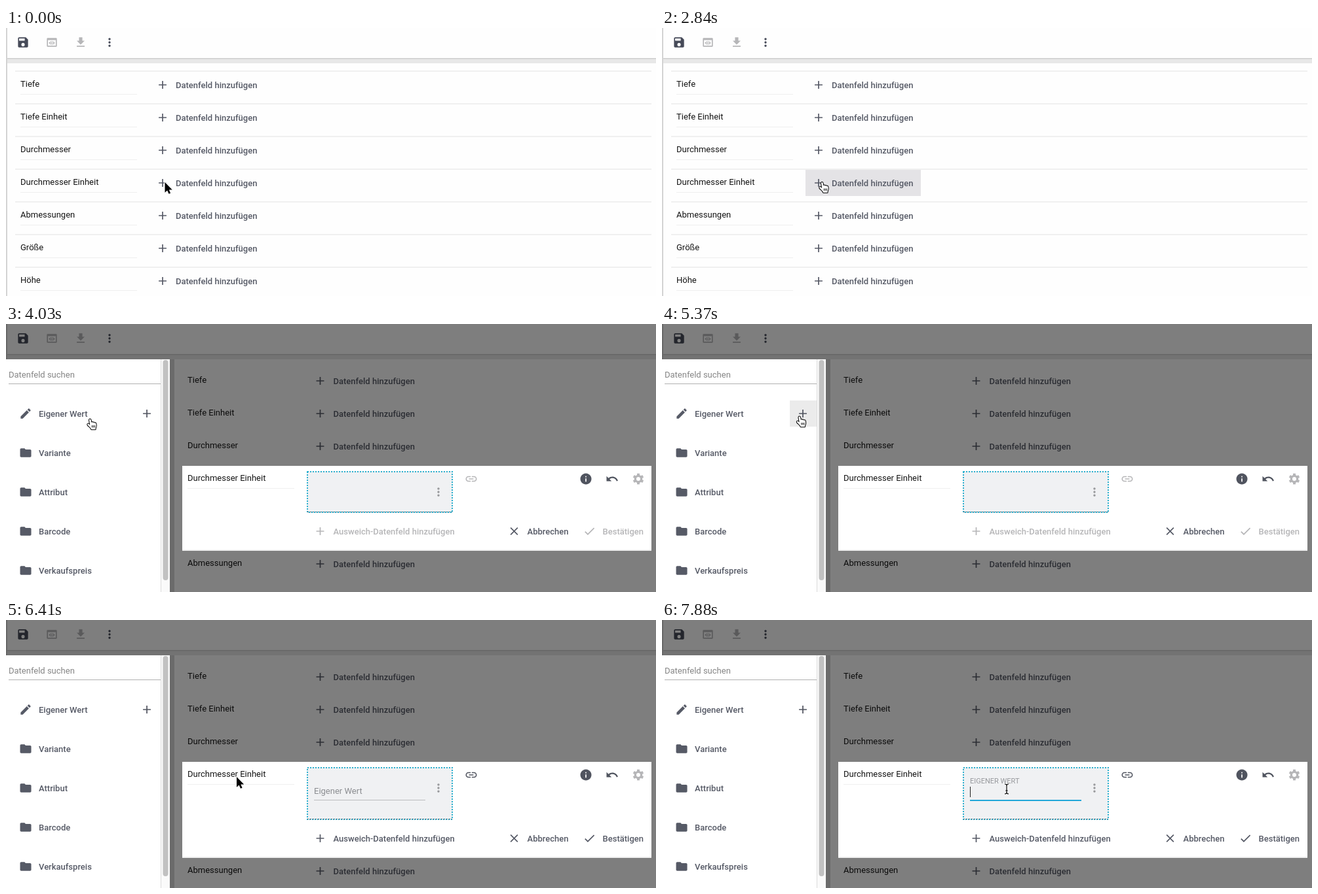
An HTML page with a canvas for the animation above (8000 ms loop, 992 by 410 pixels).

```html
<!DOCTYPE html>
<html lang="de">
<head>
<meta charset="utf-8">
<title>Datenfeld hinzufügen</title>
<style>
html, body { margin: 0; width: 100%; height: 100%; overflow: hidden; background: #fff; }
canvas { display: block; }
</style>
</head>
<body>
<canvas id="stage" width="992" height="410"></canvas>
<script>
const ctx = document.getElementById('stage').getContext('2d');
const LOOP = 8000;
const INK = '#151515', DARK = '#565a66', ICON = '#50545f', OFF = '#b6b6b8', HINT = '#8b8d91';

const ICONS = {
  save: 'M17 3H5c-1.1 0-2 .9-2 2v14c0 1.1.9 2 2 2h14c1.1 0 2-.9 2-2V7zM12 19a3 3 0 1 1 0-6a3 3 0 1 1 0 6zM15 9H5V5h10z',
  preview: 'M4 4h16l1 1v14l-1 1H4l-1-1V5zM5 8v10h14V8zM6.5 13q5.5-7 11 0q-5.5 7-11 0zM12 10.4a2.6 2.6 0 1 0 .01 0zM12 11.6a1.4 1.4 0 1 0 .01 0z',
  download: 'M19 9h-4V3H9v6H5l7 7zM5 18v2h14v-2z',
  more: 'M12 4a2 2 0 1 0 .01 0zM12 10a2 2 0 1 0 .01 0zM12 16a2 2 0 1 0 .01 0z',
  add: 'M11 5h2v6h6v2h-6v6h-2v-6H5v-2h6z',
  folder: 'M10 4H4c-1.1 0-2 .9-2 2v12c0 1.1.9 2 2 2h16c1.1 0 2-.9 2-2V8c0-1.1-.9-2-2-2h-8z',
  edit: 'M3 17.25V21h3.75L17.8 9.94l-3.75-3.75zM20.7 7.04c.4-.4.4-1 0-1.4l-2.3-2.35c-.4-.4-1-.4-1.4 0l-1.85 1.83 3.75 3.75z',
  link: 'M3.9 12A3.1 3.1 0 0 1 7 8.9h4V7H7a5 5 0 0 0 0 10h4v-1.9H7A3.1 3.1 0 0 1 3.9 12zM8 13h8v-2H8zM17 7h-4v1.9h4a3.1 3.1 0 0 1 0 6.2h-4V17h4a5 5 0 0 0 0-10z',
  info: 'M12 2a10 10 0 1 0 .01 0zM11 11h2v6h-2zM11 7h2v2h-2z',
  undo: 'M12.5 8c-2.65 0-5.05 1-6.9 2.6L2 7v9h9l-3.6-3.6c1.4-1.2 3.15-1.9 5.1-1.9 3.55 0 6.55 2.3 7.6 5.5l2.37-.8C21.1 11 17.15 8 12.5 8z',
  close: 'M5 6.4L6.4 5 12 10.6 17.6 5 19 6.4 13.4 12 19 17.6 17.6 19 12 13.4 6.4 19 5 17.6 10.6 12z',
  check: 'M9 16.2L4.8 12l-1.4 1.4L9 19 21 7l-1.4-1.4z'
};
for (const name in ICONS) ICONS[name] = new Path2D(ICONS[name]);

const ARROW = new Path2D('M0 0V15.8L3.6 12.4 6 17.8 8.6 16.7 6.3 11.4H11.2z');
const HAND = new Path2D('M4.7 9.5L3.5 2.3C3.2.2 5.7 0 6.1 1.9L7 6C7.1 4.7 9.2 4.8 9.4 6.2 9.7 5.1 11.5 5.3 11.7 6.7 12.2 5.8 13.7 6.2 13.9 7.6L14.2 10C14.3 12.6 13 13.2 13 16.3H6.7C6.2 13.9 3.2 12.2 1 9.5.2 7.9 1.7 7.1 2.9 8z');
const FINGERS = new Path2D('M7.9 10v3.4M9.9 10v3.4M11.9 10v3.4');
const BEAM = new Path2D('M-3-7.5Q0-7.5 0-5.3Q0-7.5 3-7.5M0-5.5V5.5M-3 7.5Q0 7.5 0 5.3Q0 7.5 3 7.5M-1.7 2.5H1.7');

// Pointer poses, held until the next one: time, shape, x, y
const POSES = [
  [0, 'arrow', 242.5, 236], [150, 'arrow', 237.5, 236.5], [900, 'arrow', 233.5, 237],
  [1650, 'arrow', 236, 237], [1800, 'arrow', 241, 236.5], [1940, 'hand', 239.5, 235.5],
  [2990, 'arrow', 243.5, 233],
  [3290, 'arrow', 238, 230], [3440, 'hand', 205, 213], [3580, 'hand', 145, 184],
  [3730, 'hand', 84, 157], [3880, 'hand', 67, 146], [4030, 'hand', 123.5, 145],
  [4170, 'hand', 183, 147], [4320, 'hand', 204, 142], [4470, 'hand', 205.5, 141.5],
  [5370, 'hand', 205, 141],
  [6110, 'hand', 212, 147], [6260, 'arrow', 262, 181], [6400, 'arrow', 352, 240],
  [6550, 'arrow', 445, 294], [6700, 'hand', 503, 320], [6850, 'arrow', 522, 296],
  [6990, 'arrow', 524.5, 269.5], [7140, 'beam', 526, 259], [7290, 'beam', 526, 258.5]
];

function rect(x, y, w, h, color) {
  ctx.fillStyle = color;
  ctx.fillRect(x, y, w, h);
}

function text(str, x, y, color = INK, weight = 400, size = 13) {
  ctx.font = `${weight} ${size}px Roboto, sans-serif`;
  ctx.fillStyle = color;
  ctx.fillText(str, x, y);
}

// Icons are drawn on a 24 unit grid around their centre
function icon(name, x, y, color = ICON) {
  ctx.save();
  ctx.translate(x, y);
  ctx.scale(.85, .85);
  ctx.translate(-12, -12);
  ctx.fillStyle = color;
  ctx.fill(ICONS[name], 'evenodd');
  ctx.restore();
}

function gear(x, y, color) {
  ctx.save();
  ctx.translate(x, y);
  ctx.strokeStyle = color;
  ctx.lineWidth = 3.2;
  ctx.beginPath();
  ctx.arc(0, 0, 4.6, 0, 7);
  ctx.stroke();
  ctx.lineWidth = 4;
  for (let i = 0; i < 6; i++) {
    ctx.rotate(Math.PI / 3);
    ctx.beginPath();
    ctx.moveTo(0, -5);
    ctx.lineTo(0, -8.3);
    ctx.stroke();
  }
  ctx.restore();
}

function button(name, label, x, y, color = DARK) {
  icon(name, x, y, color);
  text(label, x + 20, y + 5, color, 500);
}

function row(label, y, labelX, buttonX) {
  text(label, labelX, y + 24);
  button('add', 'Datenfeld hinzufügen', buttonX, y + 21);
}

function toolbar() {
  rect(0, 0, 992, 410, '#fefefe');
  rect(0, 46, 992, 8, '#e8e8e8');
  rect(0, 46, 992, 1, '#cbcbcb');
  rect(0, 47, 992, 1, '#dedede');
  rect(0, 0, 2, 410, '#d4d4d4');
  icon('save', 26, 22, '#464a58');
  icon('preview', 70, 22, OFF);
  icon('download', 114, 22, OFF);
  icon('more', 158, 22, '#464a58');
}

const BEFORE = ['Tiefe', 'Tiefe Einheit', 'Durchmesser'];
const AFTER = ['Abmessungen', 'Größe', 'Höhe'];

function listView(t) {
  [...BEFORE, 'Durchmesser Einheit', ...AFTER].forEach((label, i) => {
    const y = 66 + 50 * i;
    rect(14, y - 1, 971, 2, '#f0f0f0');
    rect(22, y + 35, 178, 1, '#efefef');
    if (i === 3 && t >= 1940) rect(219, 217, 176, 40, t < 2690 ? '#f6f6f7' : '#e4e3e6');
    row(label, y, 22, 239);
  });
}

function sidePanel(t) {
  rect(0, 54, 250, 356, '#fff');
  rect(236, 54, 1, 356, '#dcdcdc');
  rect(237, 54, 13, 356, '#fafafa');
  ctx.fillStyle = t < 3440 ? '#7e7e7e' : '#c1c1c1';
  ctx.beginPath();
  ctx.roundRect(239.5, 55, 8, 337, 4);
  ctx.fill();
  text('Datenfeld suchen', 4, 82, '#858585');
  rect(4, 91, 232, 1, '#b0b0b0');
  if (t >= 4320 && t < 6260) rect(195, 117, 41, 40, '#ebebeb');
  ['Eigener Wert', 'Variante', 'Attribut', 'Barcode', 'Verkaufspreis'].forEach((label, i) =>
    button(i ? 'folder' : 'edit', label, 30, 137 + 60 * i));
  icon('add', 215, 137);
}

function valueField(t) {
  const focus = Math.min(1, Math.max(0, (t - 7430) / 300));
  if (t < 7580) {
    text('Eigener Wert', 470, 266, HINT);
    rect(470, 275, 170, 1, '#bbbcbe');
    return;
  }
  text('EIGENER WERT', 470, 258 - 8 * focus, '#96989c', 400, 11);
  rect(470, 275, 170, 1, '#bbbcbe');
  rect(555 - 85 * focus, 275, 170 * focus, 2, '#22a7d9');
  if (t >= 7730) rect(470, 255, 1, 16, '#222');
}

function editCard(t) {
  const filled = t >= 5660;
  const grow = filled ? 17 : 0;
  const active = filled ? DARK : OFF;
  const actionsY = 317 + grow;
  rect(269, 217, 716, 130 + grow, '#fff');
  rect(269, 345 + grow, 716, 2, '#f0f0f0');
  text('Durchmesser Einheit', 277, 240);
  rect(277, 251, 163, 1, '#efefef');

  rect(459, 225, 223, 64 + grow, '#f0f1f3');
  ctx.save();
  ctx.setLineDash([2, 2]);
  ctx.lineWidth = 2;
  ctx.strokeStyle = '#2bb0cf';
  ctx.strokeRect(460, 226, 221, 62 + grow);
  ctx.lineWidth = 1;
  ctx.strokeStyle = 'rgba(50, 60, 70, .7)';
  ctx.beginPath();
  ctx.moveTo(460, 287.5 + grow);
  ctx.lineTo(681, 287.5 + grow);
  ctx.stroke();
  ctx.restore();
  if (filled) valueField(t);

  icon('more', 660, 257, '#98999c');
  icon('link', 710, 237, filled ? ICON : OFF);
  icon('info', 885, 237);
  icon('undo', 925, 237);
  gear(965, 237, OFF);
  if (t >= 6700 && t < 6850) rect(460, 314, 237, 40, '#f6f6f6');
  button('add', 'Ausweich-Datenfeld hinzufügen', 479.5, actionsY, active);
  button('close', 'Abbrechen', 775.5, actionsY);
  button('check', 'Bestätigen', 890.5, actionsY, active);
}

function editView(t) {
  const shift = t < 5660 ? 80 : 97;
  rect(250, 54, 7, 356, '#d8d8d8');
  BEFORE.forEach((label, i) => row(label, 66 + 50 * i, 277, 479.5));
  AFTER.forEach((label, i) => row(label, 266 + shift + 50 * i, 277, 479.5));
  rect(0, 0, 992, 410, 'rgba(0, 0, 0, .5)');
  sidePanel(t);
  editCard(t);
}

function outlined(path, fill, edge, width) {
  ctx.lineWidth = width;
  ctx.strokeStyle = edge;
  ctx.stroke(path);
  if (fill) {
    ctx.fillStyle = fill;
    ctx.fill(path);
  }
}

function pointer(t) {
  const [, shape, x, y] = POSES.findLast(pose => pose[0] <= t);
  ctx.save();
  ctx.translate(x, y);
  ctx.lineJoin = 'round';
  if (shape === 'arrow') {
    outlined(ARROW, '#000', '#fff', 2);
  } else if (shape === 'hand') {
    outlined(HAND, '#fff', '#000', 2);
    outlined(FINGERS, null, '#000', .9);
  } else {
    outlined(BEAM, null, '#fff', 2.6);
    outlined(BEAM, null, '#000', 1.2);
  }
  ctx.restore();
}

function draw() {
  const t = performance.now() % LOOP;
  toolbar();
  if (t < 2990) listView(t);
  else editView(t);
  pointer(t);
  requestAnimationFrame(draw);
}
draw();
</script>
</body>
</html>
```
